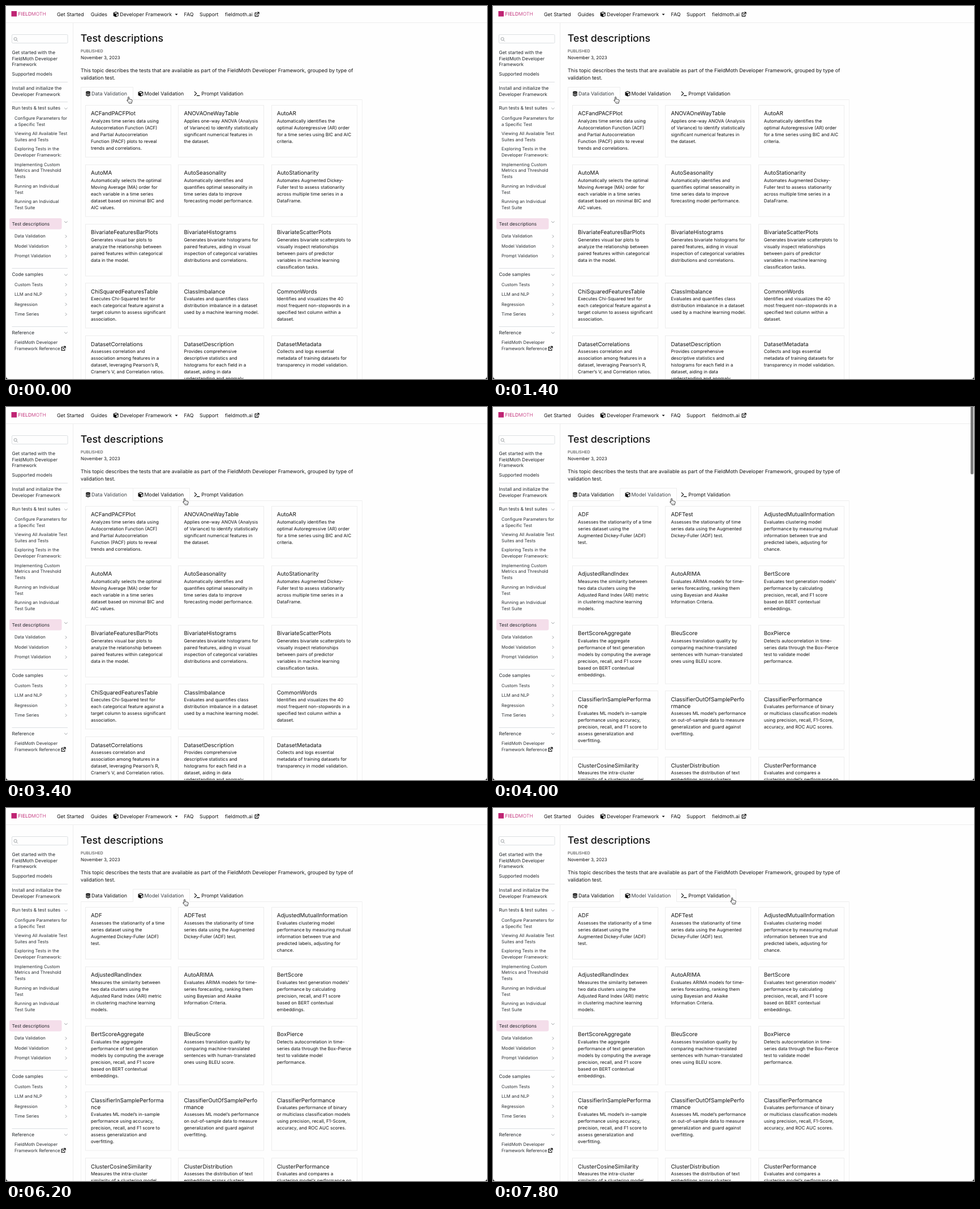
Recreate the animation shown at these times as an HTML page. Size 850 px wide and 659 px high, loop 8000 ms.

```html
<!DOCTYPE html>
<html lang="en">
<head>
<meta charset="utf-8">
<title>Test descriptions</title>
<style>
html, body { margin: 0; width: 100%; height: 100%; overflow: hidden; background: #fefefe; }
svg { display: block; }
text { font-family: Inter, "Noto Sans", sans-serif; font-optical-sizing: none; text-rendering: geometricPrecision; white-space: pre; fill: #121212; }
.nav { font-size: 8.86px; }
.tab, .lead { font-size: 8.92px; }
.tab.active { fill: #3c4147; }
.h1 { font-size: 17.8px; font-weight: 500; }
.label { font-size: 7.1px; fill: #3a3a3a; }
.date { font-size: 7.92px; }
.side { font-size: 8.23px; fill: #23272b; }
.sub { font-size: 7.77px; fill: #2b2f33; }
.name { font-size: 9.78px; }
.desc { font-size: 8.03px; }
.logo { font-size: 8.6px; fill: #bf2473; }
.line { fill: none; stroke: #ededed; }
.faint { fill: none; stroke: #f2f2f2; }
.rule { fill: none; stroke: #dcdfe2; }
.chev { fill: none; stroke: #85898d; stroke-width: .8; }
.icon { fill: #121212; }
.stroke { fill: none; stroke: #121212; stroke-width: 1.2; stroke-linejoin: round; stroke-linecap: round; }
</style>
</head>
<body>
<svg id="stage" width="850" height="659" viewBox="0 0 850 659"></svg>
<script>
const stage = document.getElementById('stage');

function add(parent, tag, attrs, content) {
  const el = document.createElementNS('http://www.w3.org/2000/svg', tag);
  for (const key in attrs) el.setAttribute(key, attrs[key]);
  if (content) el.textContent = content;
  parent.appendChild(el);
  return el;
}
const group = (transform = '', parent = stage) => add(parent, 'g', { transform });
const path = (d, cls, parent = stage) => add(parent, 'path', { d, class: cls });
const text = (x, y, cls, str, parent = stage) => add(parent, 'text', { x, y, class: cls }, str);
const box = (x, y, width, height, cls, parent = stage) =>
  add(parent, 'rect', { x, y, width, height, class: cls });

// Icons, each centred on x, y
function cube(x, y) {
  const g = group(`translate(${x} ${y})`);
  path('M0 -4.8L4.5 -3V2.8L0 4.8L-4.5 2.8V-3Z', 'icon', g);
  add(g, 'path', { d: 'M-3.4 -2.4L0 -1.1L3.4 -2.4L0 -3.6ZM.7 3.3L3.5 2.1V-1L.7 .1Z', fill: '#fefefe' });
}
function database(x, y) {
  const g = group(`translate(${x} ${y})`);
  add(g, 'ellipse', { cx: 0, cy: -3, rx: 4, ry: 1.6, class: 'icon' });
  for (const dy of [-1.9, .8])
    path(`M-4 ${dy}Q0 ${dy + 2.4} 4 ${dy}V${dy + 1.6}Q0 ${dy + 4} -4 ${dy + 1.6}Z`, 'icon', g);
  path('M-4 3.2Q0 5 4 3.2V3.6Q0 5.8 -4 3.6Z', 'icon', g);
}
function terminal(x, y) {
  path(`M${x - 4.2} ${y - 3.4}l3.4 3.2l-3.4 3.4M${x - .2} ${y + 3.6}h4.6`, 'stroke');
}
function external(x, y) {
  const g = group(`translate(${x} ${y})`);
  path('M-.6 -2.4H-3.2V3.5H2.4V1M.8 -3.6H3.7V-.7M3.5 -3.4L-.8 .8', 'stroke', g);
}
const chevronDown = y => path(`M103.2 ${y - 1.2}l2.7 2.6l2.7 -2.6`, 'chev');
const chevronRight = y => path(`M104.8 ${y - 2.5}l2.5 2.5l-2.5 2.5`, 'chev');

// Header
add(stage, 'rect', { x: 9.5, y: 9, width: 9.5, height: 9.5, fill: '#bf2473' });
add(text(21.5, 17, 'logo', 'FIELD'), 'tspan', { 'font-weight': 300 }, 'MOTH');
for (const [x, label] of [[90, 'Get Started'], [149.8, 'Guides'], [201.3, 'Developer Framework'],
  [314.5, 'FAQ'], [342, 'Support'], [387, 'fieldmoth.ai']]) text(x, 17.9, 'nav', label);
cube(194.2, 14.8);
path('M298.6 13.8h5l-2.5 2.6z', 'icon');
external(443.3, 14.6);
path('M0 29.5H850M118.5 30V659', 'line');

// Sidebar
add(stage, 'rect', { x: 10.5, y: 50.5, width: 98.5, height: 15, rx: 1.5, class: 'rule' });
add(stage, 'circle', { cx: 16.6, cy: 58.2, r: 2.6, class: 'chev' });
path('M18.5 60.1l2.3 2.4', 'chev');
path([134.5, 169.5, 463.5, 566.5].map(y => `M10.5 ${y}H109`).join(''), 'rule');
add(stage, 'rect', { x: 6, y: 375, width: 92.5, height: 19.5, rx: 3, fill: '#f4deea' });

function sideText(x, cls, items) {
  for (const [y, ...lines] of items)
    lines.forEach((s, i) => text(x, y + 2.9 + i * 10.75, cls, s));
}
sideText(10.5, 'side', [
  [82, 'Get started with the', 'FieldMoth Developer', 'Framework'],
  [120, 'Supported models'],
  [145, 'Install and initialize the', 'Developer Framework'],
  [180.5, 'Run tests & test suites'],
  [385, 'Test descriptions'],
  [474.5, 'Code samples'],
  [577, 'Reference']
]);
sideText(15, 'sub', [
  [198, 'Configure Parameters for', 'a Specific Test'],
  [225.2, 'Viewing All Available Test', 'Suites and Tests'],
  [252.5, 'Exploring Tests in the', 'Developer Framework:'],
  [279.8, 'Implementing Custom', 'Metrics and Threshold', 'Tests'],
  [318, 'Running an Individual', 'Test'],
  [345.4, 'Running an Individual', 'Test Suite'],
  [406.5, 'Data Validation'],
  [424, 'Model Validation'],
  [441.3, 'Prompt Validation'],
  [491.8, 'Custom Tests'],
  [509.3, 'LLM and NLP'],
  [526.7, 'Regression'],
  [544.2, 'Time Series'],
  [594.5, 'FieldMoth Developer', 'Framework Reference']
]);
[181, 381.5, 475, 577.3].forEach(chevronDown);
[407, 424.5, 441.8, 492.4, 509.8, 527.2, 544.7].forEach(chevronRight);
external(101.4, 605);

// Page heading
text(131.8, 63.3, 'h1', 'Test descriptions');
text(132, 82.2, 'label', 'PUBLISHED');
text(132, 94.2, 'date', 'November 3, 2023');
text(132, 116.8, 'lead', 'This topic describes the tests that are available as part of the FieldMoth Developer Framework, grouped by type of');
text(132, 130.2, 'lead', 'validation test.');

// Tabs
const edges = [132.5, 224.5, 324.5, 429.5];
const tabLine = path('', 'line');
const hoverLine = path('', 'line');
path('M132.5 165.5V659M629.5 165.5V659', 'faint');
database(145, 155);
cube(238, 155);
terminal(337.5, 154.8);
const tabLabels = [
  text(151, 158, 'tab', 'Data Validation'),
  text(244.5, 158, 'tab', 'Model Validation'),
  text(345.3, 158, 'tab', 'Prompt Validation')
];

const outline = i => `M${edges[i]} 165.5V143.5H${edges[i + 1]}V165.5`;
function showTabs(active, hovered) {
  tabLine.setAttribute('d', `${outline(active)}M132.5 165.5H${edges[active]}M${edges[active + 1]} 165.5H629.5`);
  hoverLine.setAttribute('d', hovered === active ? '' : outline(hovered));
  tabLabels.forEach((label, i) => label.classList.toggle('active', i === active));
}

// Cards: "title|line|line", a "~" breaks a long title
const dataCards = [
  ['ACFandPACFPlot|Analyzes time series data using|Autocorrelation Function (ACF)|and Partial Autocorrelation|Function (PACF) plots to reveal|trends and correlations.',
   'ANOVAOneWayTable|Applies one-way ANOVA (Analysis|of Variance) to identify statistically|significant numerical features in|the dataset.',
   'AutoAR|Automatically identifies the|optimal Autoregressive (AR) order|for a time series using BIC and AIC|criteria.'],
  ['AutoMA|Automatically selects the optimal|Moving Average (MA) order for|each variable in a time series|dataset based on minimal BIC and|AIC values.',
   'AutoSeasonality|Automatically identifies and|quantifies optimal seasonality in|time series data to improve|forecasting model performance.',
   'AutoStationarity|Automates Augmented Dickey-|Fuller test to assess stationarity|across multiple time series in a|DataFrame.'],
  ['BivariateFeaturesBarPlots|Generates visual bar plots to|analyze the relationship between|paired features within categorical|data in the model.',
   'BivariateHistograms|Generates bivariate histograms for|paired features, aiding in visual|inspection of categorical variables|distributions and correlations.',
   'BivariateScatterPlots|Generates bivariate scatterplots to|visually inspect relationships|between pairs of predictor|variables in machine learning|classification tasks.'],
  ['ChiSquaredFeaturesTable|Executes Chi-Squared test for|each categorical feature against a|target column to assess significant|association.',
   'ClassImbalance|Evaluates and quantifies class|distribution imbalance in a dataset|used by a machine learning model.',
   'CommonWords|Identifies and visualizes the 40|most frequent non-stopwords in a|specified text column within a|dataset.'],
  ['DatasetCorrelations|Assesses correlation and|association among features in a|dataset, leveraging Pearson’s R,|Cramer’s V, and Correlation ratios.',
   'DatasetDescription|Provides comprehensive|descriptive statistics and|histograms for each field in a|dataset, aiding in data|understanding and anomaly|detection.',
   'DatasetMetadata|Collects and logs essential|metadata of training datasets for|transparency in model validation.']
];
const modelCards = [
  ['ADF|Assesses the stationarity of a time|series dataset using the|Augmented Dickey-Fuller (ADF)|test.',
   'ADFTest|Assesses the stationarity of time|series data using the Augmented|Dickey-Fuller (ADF) test.',
   'AdjustedMutualInformation|Evaluates clustering model|performance by measuring mutual|information between true and|predicted labels, adjusting for|chance.'],
  ['AdjustedRandIndex|Measures the similarity between|two data clusters using the|Adjusted Rand Index (ARI) metric|in clustering machine learning|models.',
   'AutoARIMA|Evaluates ARIMA models for time-|series forecasting, ranking them|using Bayesian and Akaike|Information Criteria.',
   'BertScore|Evaluates text generation models’|performance by calculating|precision, recall, and F1 score|based on BERT contextual|embeddings.'],
  ['BertScoreAggregate|Evaluates the aggregate|performance of text generation|models by computing the average|precision, recall, and F1 score|based on BERT contextual|embeddings.',
   'BleuScore|Assesses translation quality by|comparing machine-translated|sentences with human-translated|ones using BLEU score.',
   'BoxPierce|Detects autocorrelation in time-|series data through the Box-Pierce|test to validate model|performance.'],
  ['ClassifierInSamplePerforma~nce|Evaluates ML model’s in-sample|performance using accuracy,|precision, recall, and F1 score to|assess generalization and|overfitting.',
   'ClassifierOutOfSamplePerfo~rmance|Assesses ML model’s performance|on out-of-sample data to measure|generalization and guard against|overfitting.',
   'ClassifierPerformance|Evaluates performance of binary|or multiclass classification models|using precision, recall, F1-Score,|accuracy, and ROC AUC scores.'],
  ['ClusterCosineSimilarity|Measures the intra-cluster|similarity of a clustering model|using cosine similarity.',
   'ClusterDistribution|Assesses the distribution of text|embeddings across clusters|produced by a model.',
   'ClusterPerformance|Evaluates and compares a|clustering model’s performance on|training and testing data.']
];

function cardGrid(rows) {
  const g = group();
  let top = 175;
  for (const row of rows) {
    const lineCounts = row.map(card => card.split(/[|~]/).length - 1);
    const height = 31.5 + 12 * Math.max(...lineCounts);
    row.forEach((card, col) => {
      const x = 140.5 + col * 164.3;
      const [title, ...lines] = card.split('|');
      const names = title.split('~');
      box(Math.floor(x) + .5, Math.round(top) + .5, 151, Math.round(height) - .5, 'line', g);
      names.forEach((s, i) => text(x + 9.6, top + 18.4 + i * 11.8, 'name', s, g));
      const first = top + 31 + (names.length - 1) * 12;
      lines.forEach((s, i) => text(x + 9.6, first + i * 12, 'desc', s, g));
    });
    top += height + 13.3;
  }
  return g;
}
const panels = [cardGrid(dataCards), cardGrid(modelCards)];

// Scrollbar, window corners, pointer
const scrollbar = add(stage, 'rect', { x: 844, y: -3, width: 5, height: 122, rx: 2.5, fill: '#7d7d7d' });
path('M0 654Q0 659 5 659H0ZM850 654Q850 659 845 659H850Z', 'icon');
const pointer = group();
add(pointer, 'path', {
  d: 'M2.6 7V1.6a1 1 0 0 1 2 0V4.8q1.1-.6 1.8.3q1.1-.5 1.7.4q1.8-.3 1.9 1.2V8.4L9.1 10.2V11.8H4.2V10.6L1 7.6q-.8-1.4.5-1.5z',
  fill: '#fff', stroke: '#222', 'stroke-width': .9, 'stroke-linejoin': 'round'
});
path('M5.4 8v2M7.4 8v2', 'chev', pointer);

// Motion: [time, x, y]
const LOOP = 8000, STEP = 200;
const moves = [
  [0, 218, 166], [1800, 218, 166], [2000, 219, 166.2], [2200, 224, 166.8], [2400, 235, 167.5],
  [2600, 248, 168], [2800, 273, 168], [3000, 298, 167.6], [3200, 314, 167.2], [3400, 317, 167],
  [6400, 317, 167], [6600, 319, 167], [6800, 330, 166.4], [7000, 352, 165.6], [7200, 382, 164.8],
  [7400, 409, 164.2], [7600, 423.4, 164], [7800, 424, 164], [8000, 424, 164]
];
const fade = [[0, 0], [3999, 0], [4000, 1], [4200, 1], [4400, .5], [4600, 0], [8000, 0]];

function sample(keys, t) {
  const i = Math.max(1, keys.findIndex(k => k[0] >= t));
  const [a, b] = [keys[i - 1], keys[i]];
  const p = (t - a[0]) / (b[0] - a[0]);
  return a.slice(1).map((v, j) => v + (b[j + 1] - v) * p);
}

function draw() {
  const t = Math.floor(performance.now() % LOOP / STEP) * STEP;
  const [x, y] = sample(moves, t);
  const active = t < 4000 ? 0 : 1;
  const tip = x - 1.5;
  showTabs(active, tip < edges[1] ? 0 : tip < edges[2] ? 1 : 2);
  panels.forEach((panel, i) => panel.style.display = i === active ? '' : 'none');
  scrollbar.setAttribute('opacity', sample(fade, t)[0]);
  pointer.setAttribute('transform', `translate(${x - 5} ${y - 6})`);
  requestAnimationFrame(draw);
}
draw();
</script>
</body>
</html>
```
